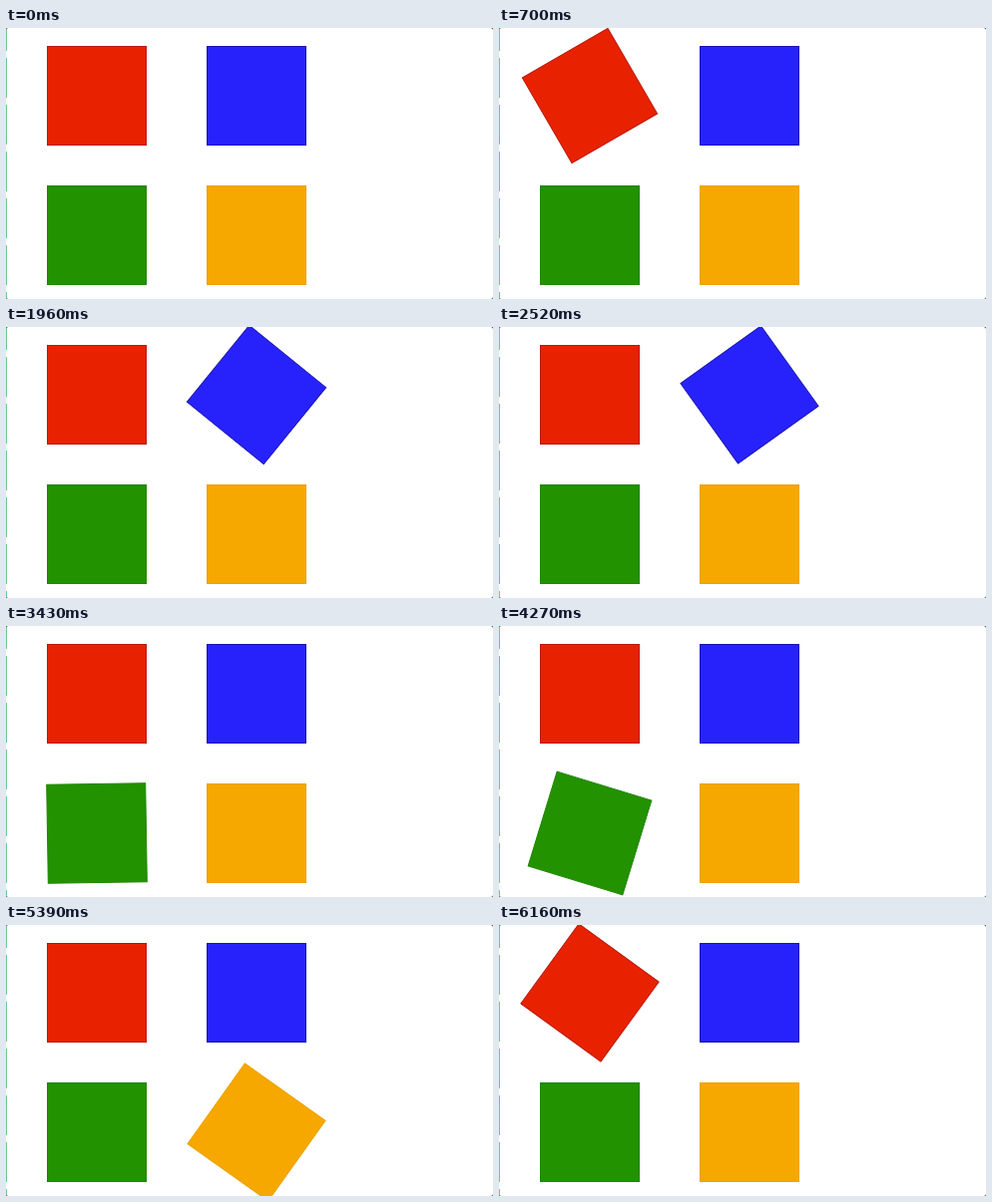
Write an HTML page that moves like this. It is 488 px wide and 272 px high and loops after 6230 ms.

```html
<!DOCTYPE html>
<html>
<head>
<meta charset="utf-8">
<style>
  html, body { margin: 0; width: 488px; height: 272px; overflow: hidden; background: #3c4a42; }
  svg { display: block; background: #fff; border-radius: 2.5px; }
</style>
</head>
<body>
<svg width="488" height="272">
  <path d="M.5 -17V271" stroke="#6cc88c" stroke-dasharray="40 7"/>
  <g id="squares"></g>
</svg>
<script>
const LOOP = 6230, STEP = 70;

// Each turn: start ms, end ms, total degrees
const squares = [
  { x: 91, y: 68, fill: '#e82200', edge: '#b8180c', turns: [[0, 1313, 450], [5800, 7086, 450]] },
  { x: 251, y: 68, fill: '#2722fb', edge: '#1a14b4', turns: [[1332, 2622, 450]] },
  { x: 91, y: 208, fill: '#229200', edge: '#208600', turns: [[2645, 4483, 630]] },
  { x: 251, y: 208, fill: '#f6a800', edge: '#eca200', turns: [[4507, 5808, 450]] }
];

const group = document.getElementById('squares');
for (const s of squares) {
  s.node = document.createElementNS('http://www.w3.org/2000/svg', 'rect');
  const attrs = { x: -49.5, y: -49.5, width: 99, height: 99, fill: s.fill, stroke: s.edge };
  for (const name in attrs) s.node.setAttribute(name, attrs[name]);
  group.append(s.node);
}

const progress = (t, a, b) => Math.min(1, Math.max(0, (t - a) / (b - a)));

function draw(now) {
  const t = Math.floor(now % LOOP / STEP) * STEP;
  for (const { node, x, y, turns } of squares) {
    const angle = turns.reduce((sum, [a, b, deg]) => sum + deg * progress(t, a, b), 0);
    // A finished square rests on a quarter turn; drop it to keep the edges crisp
    node.setAttribute('transform', `translate(${x} ${y}) rotate(${angle % 90})`);
  }
  requestAnimationFrame(() => draw(performance.now() - begin));
}

const begin = performance.now();
draw(0);
</script>
</body>
</html>
```
